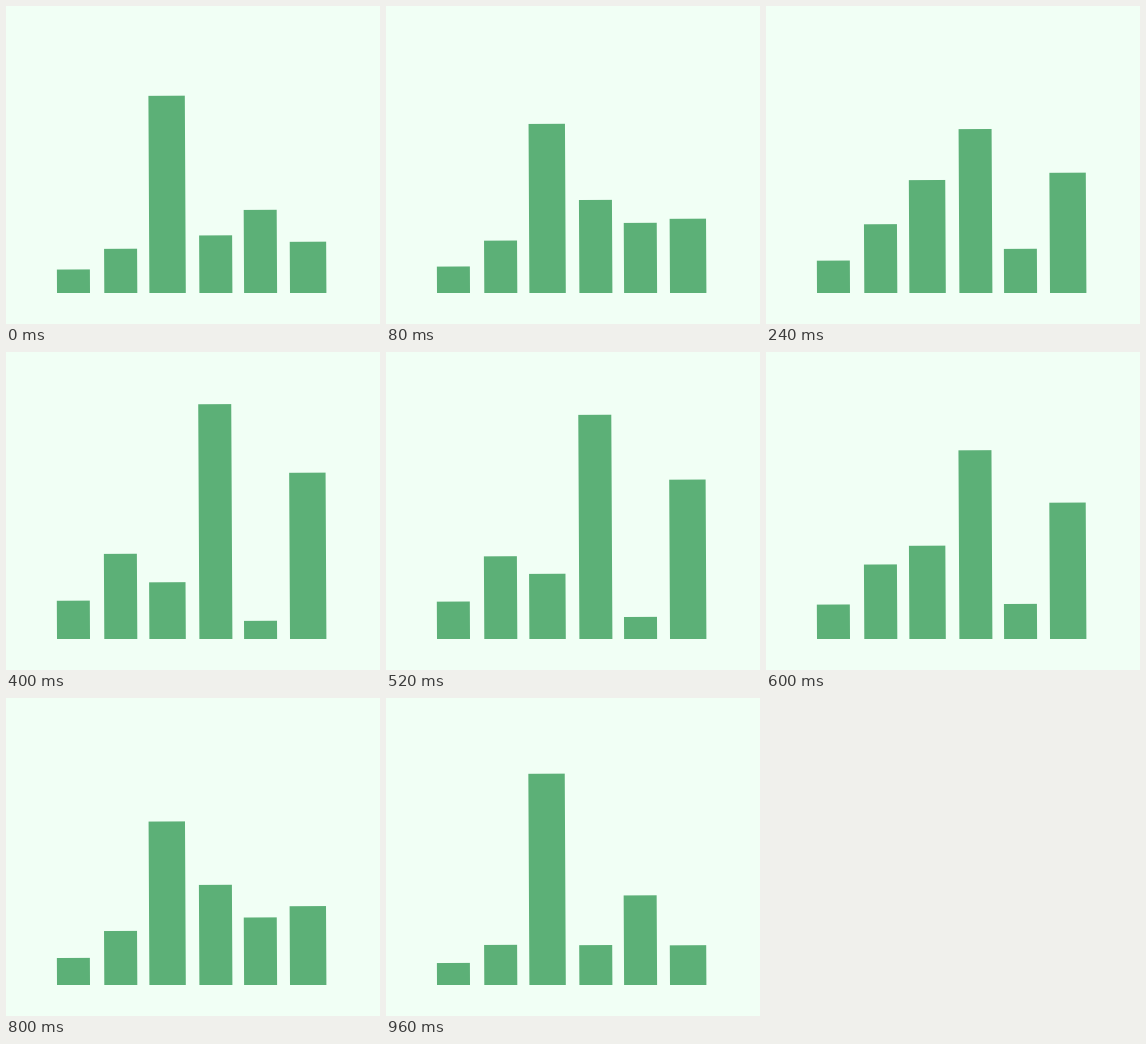
A matplotlib script for the animation above (1000 ms loop, 374 px wide and 318 px high).

```python
import matplotlib.pyplot as plt
from matplotlib.animation import FuncAnimation
from matplotlib.patches import Polygon

WIDTH, HEIGHT, DPI = 374, 318, 100
FRAMES, INTERVAL = 25, 40
LOOP = FRAMES * INTERVAL
PHASE = 52        # ms since the last turning point when the loop starts
BASE = 287        # y of the common baseline
LEAN = 0.005      # slight tilt of every bar to the left

BACKGROUND = "#f1fff5"
GREEN = "#5cb077"

# left edge, then height at either end of the swing
BARS = [
    (51, 21.5, 40),
    (98.3, 38.8, 90),
    (143.4, 215.4, 39.8),
    (193.4, 34.5, 256),
    (238.1, 91.5, 10.3),
    (284, 36.2, 180),
]


def swing(ms):
    """Triangle wave: 0 to 1 and back over one loop."""
    phase = (ms + PHASE) % LOOP / LOOP
    return 1 - abs(1 - 2 * phase)


def bar_outline(index, amount):
    left, start, end = BARS[index]
    width = 36.4 if index % 3 == 2 else 33   # every third bar is wider
    height = start + (end - start) * amount
    shift, rise = LEAN * height, LEAN * width
    right, top = left + width, BASE - height
    return [(left, BASE), (left - shift, top),
            (right - shift, top - rise), (right, BASE)]


fig = plt.figure(figsize=(WIDTH / DPI, HEIGHT / DPI), dpi=DPI,
                 facecolor=BACKGROUND)
ax = fig.add_axes([0, 0, 1, 1])
ax.set_xlim(0, WIDTH)
ax.set_ylim(HEIGHT, 0)
ax.axis("off")
patches = [ax.add_patch(Polygon(bar_outline(i, 0), facecolor=GREEN, linewidth=0))
           for i in range(len(BARS))]


def update(frame):
    amount = swing(frame * INTERVAL)
    for i, patch in enumerate(patches):
        patch.set_xy(bar_outline(i, amount))
    return patches


animation = FuncAnimation(fig, update, frames=FRAMES, interval=INTERVAL,
                          repeat=True, repeat_delay=0)
plt.show()
```
